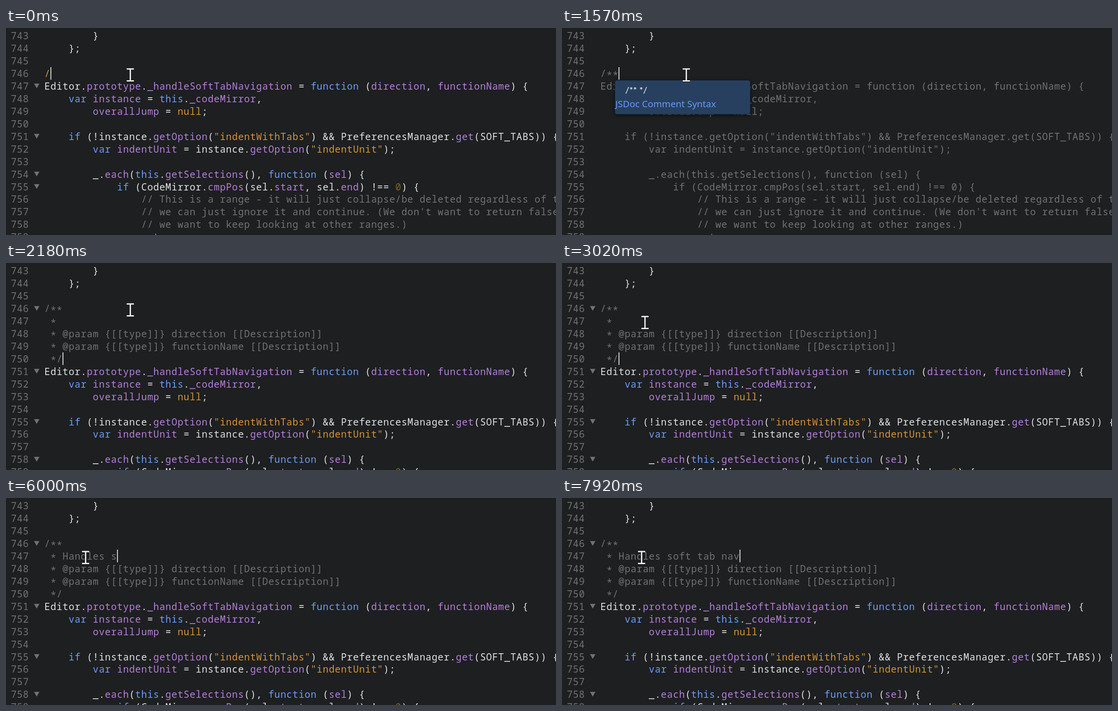
Write an HTML page that moves like this. It is 1218x460 px and loops after 8 s.

```html
<!DOCTYPE html>
<html lang="en">
<head>
<meta charset="utf-8">
<title>Editor</title>
<style>
  html, body { margin: 0; width: 100%; height: 100%; overflow: hidden; background: #1d1f21; }
  svg { display: block; width: 100vw; height: 100vh; }
  .code { font: 21px "Noto Sans Mono", "DejaVu Sans Mono", monospace; letter-spacing: .8px; }
  #hint rect { fill: #28405f; stroke: #1c2c42; filter: drop-shadow(0 2px 4px rgba(0, 0, 0, .6)); }
  #hint .tag { font: 20px Lato, sans-serif; fill: #fff; }
  #hint .label { font: 20.4px "Noto Sans", sans-serif; fill: #6699f2; }
  #pointer path { fill: none; }
</style>
</head>
<body>
<svg viewBox="0 0 1218 460">
  <rect width="1218" height="460" fill="#1d1f21"/>
  <g id="lines" class="code"></g>
  <g id="hint">
    <rect x="117.5" y="116.5" width="299" height="75" rx="4"/>
    <text class="tag" x="140" y="145">/** */</text>
    <text class="label" x="118" y="176">JSDoc Comment Syntax</text>
  </g>
  <rect id="caret" width="1.8" height="28" fill="#eee"/>
  <g id="pointer">
    <path d="M-8-13.3H8M0-13.3V13.3M-8 13.3H8" stroke="#111214" stroke-width="5"/>
    <path d="M-8-13.3H8M0-13.3V13.3M-8 13.3H8" stroke="#f0f0f0" stroke-width="3"/>
  </g>
</svg>
<script>
const LOOP = 8000;
const FIRST_LINE = 742, ROWS = 18;
const LEFT = 85.1, CHAR = 13.4, LINE = 27.93;
const GRAY = '#727272', PLAIN = '#e2e2e2', BLUE = '#6c9ef8',
      PURPLE = '#b77fdb', ORANGE = '#d89333', BROWN = '#8a5f25';

const before = ['            false;', '        }', '    };', ''];
const after = [
  'Editor.prototype._handleSoftTabNavigation = function (direction, functionName) {',
  '    var instance = this._codeMirror,',
  '        overallJump = null;',
  '',
  '    if (!instance.getOption("indentWithTabs") && PreferencesManager.get(SOFT_TABS)) {',
  '        var indentUnit = instance.getOption("indentUnit");',
  '',
  '        _.each(this.getSelections(), function (sel) {',
  '            if (CodeMirror.cmpPos(sel.start, sel.end) !== 0) {',
  '                // This is a range - it will just collapse/be deleted regardless of the',
  "                // we can just ignore it and continue. (We don't want to return false",
  '                // we want to keep looking at other ranges.)',
  '                return;'
];

const rules = [
  [/\/\/.*/y, GRAY],
  [/"[^"]*"|null/y, ORANGE],
  [/\b(?:var|function|if|this|return)\b/y, BLUE],
  [/\b\d+\b/y, BROWN],
  [/(?<=\.|var |function \()\w+|functionName|overallJump/y, PURPLE],
  [/\w+|[^\w\s]/y, PLAIN]
];
const commentRules = [[/\*|[^\s*]+/y, GRAY]];
const regexpRules = [[/\S+/y, ORANGE]];

const summary = 'Handles soft tab nav';
const keyTimes = [4680, 4910, 4990, 5290, 5370, 5450, 5520, 5600, 6000, 6080,
                  6230, 6380, 6470, 6690, 6850, 7070, 7230, 7380, 7470, 7920];

// Caret keyframes: time, row, column; without a row the caret is hidden.
const caretKeys = [
  [0, 4, 1], [320, 4, 2], [530, 4, 3], [1000], [1570, 4, 3],
  [1780, 8, 3], [2260], [2820, 8, 3], [3340], [3530, 5, 2], [4130, 5, 3],
  ...keyTimes.map((t, i) => [t, 5, i + 4])
];
const pointerKeys = [
  [0, 275.3, 104.3], [2740, 269, 106], [2820, 251, 112], [2890, 226, 121],
  [2960, 201, 129], [3020, 183.8, 132.3], [3130, 178, 132.3], [3200, 176.3, 132.3]
];

const byId = id => document.getElementById(id);
const lines = byId('lines'), hint = byId('hint'), caret = byId('caret'), pointer = byId('pointer');
const latest = (keys, t) => keys.filter(k => k[0] <= t).pop();
const baseline = row => 25.4 + LINE * (row - 1);
const columnX = col => LEFT + CHAR * col;

function add(name, attrs, text = '') {
  const node = document.createElementNS('http://www.w3.org/2000/svg', name);
  for (const key in attrs) node.setAttribute(key, attrs[key]);
  node.textContent = text;
  lines.append(node);
}

function drawLine(text, row, ruleSet) {
  const y = baseline(row);
  let col = 0;
  while (col < text.length) {
    let size = 1;
    for (const [pattern, fill] of ruleSet) {
      pattern.lastIndex = col;
      const match = pattern.exec(text);
      if (!match) continue;
      size = match[0].length;
      // Asterisks sit at mid height.
      const drop = match[0] === '*' ? 3.5 : 0;
      add('text', { x: columnX(col), y: y + drop, fill }, match[0]);
      break;
    }
    col += size;
  }
}

function docBlock(t) {
  if (t < 1780) return ['/**'.slice(0, t < 320 ? 1 : t < 530 ? 2 : 3)];
  const typed = keyTimes.filter(k => k <= t).length;
  return [
    '/**',
    ' * ' + summary.slice(0, typed),
    ' * @param {[[type]]} direction [[Description]]',
    ' * @param {[[type]]} functionName [[Description]]',
    ' */'
  ];
}

let shown = '';
function drawText(t) {
  const doc = docBlock(t);
  const dimmed = t >= 1000 && t < 2180;
  const key = doc.join('\n') + dimmed;
  if (key === shown) return;
  shown = key;
  lines.replaceChildren();

  const all = [...before, ...doc, ...after].slice(0, ROWS);
  const docEnd = before.length + doc.length;
  all.forEach((text, row) => {
    const y = baseline(row);
    const inDoc = row >= before.length && row < docEnd;
    let ruleSet = rules;
    if (inDoc) ruleSet = text === '/' ? regexpRules : commentRules;
    else if (dimmed && row >= docEnd) ruleSet = commentRules;

    add('text', { x: 10.8, y, fill: GRAY }, FIRST_LINE + row);
    drawLine(text, row, ruleSet);
    const foldable = inDoc ? doc.length > 1 && text === '/**' : text.endsWith('{');
    if (foldable && !dimmed && row < ROWS - 1)
      add('path', { d: `M62 ${y - 13.5}h12l-6 10.5z`, fill: GRAY });
  });
}

function render(t) {
  drawText(t);
  hint.style.display = t >= 620 && t < 1780 ? '' : 'none';

  const [, row, col] = latest(caretKeys, t);
  caret.style.display = row === undefined ? 'none' : '';
  if (row !== undefined) {
    caret.setAttribute('x', columnX(col));
    caret.setAttribute('y', baseline(row) - 22.3);
  }

  const [, x, y] = latest(pointerKeys, t);
  pointer.setAttribute('transform', `translate(${x} ${y})`);
}

const start = performance.now();
function tick() {
  render((performance.now() - start) % LOOP);
  requestAnimationFrame(tick);
}
tick();
</script>
</body>
</html>
```
